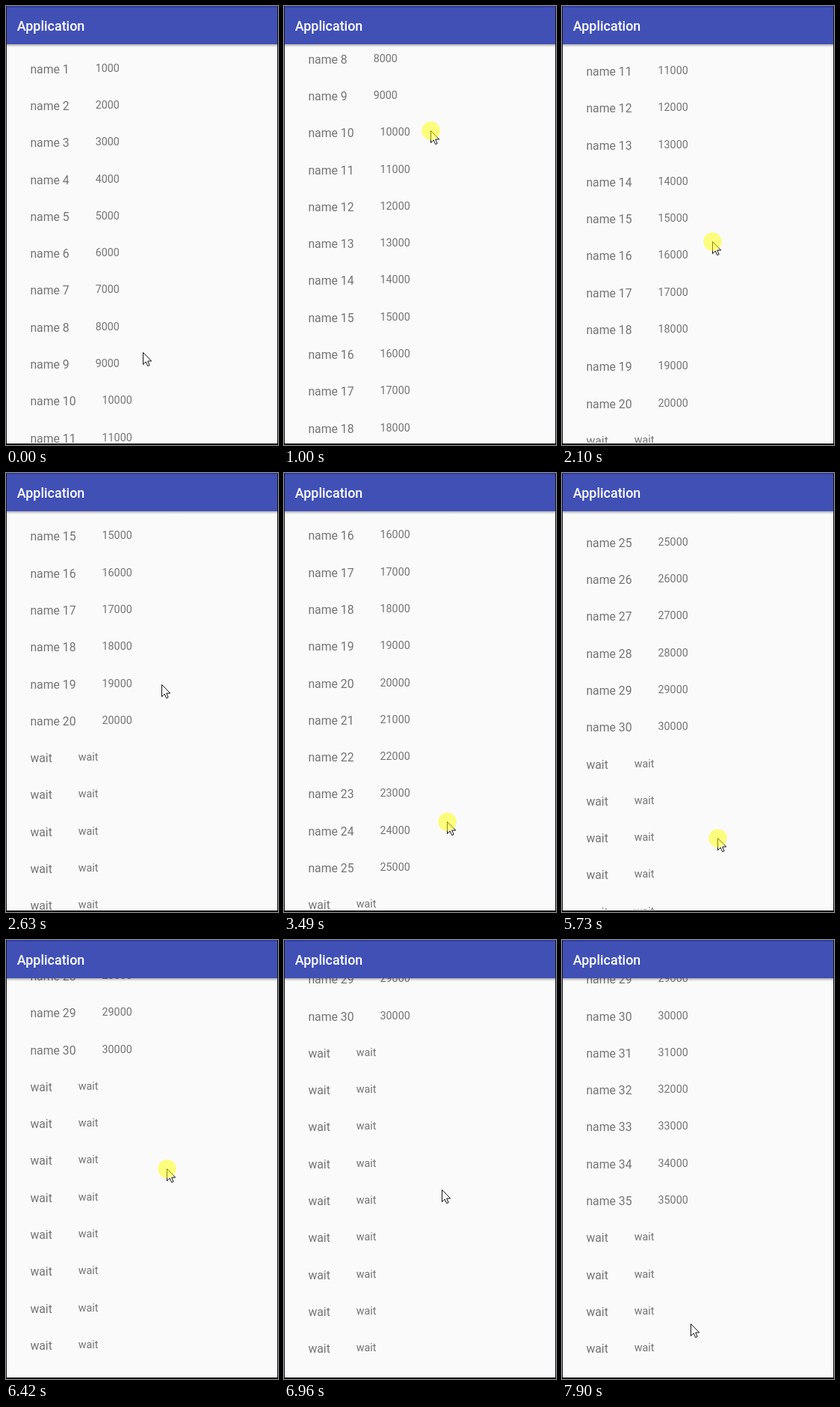
These frames come from a looping animation (364x586 px, 7990 ms). An HTML page:

```html
<!DOCTYPE html>
<html lang="en">
<head>
<meta charset="utf-8">
<title>Application</title>
<style>
  html, body { margin: 0; width: 100%; height: 100%; overflow: hidden; background: #fafafa; }
  svg { display: block; }
  text { font-family: Roboto, sans-serif; fill: #747474; }
  .name { font-size: 15.8px; }
  .value { font-size: 14.3px; }
  .title { font-size: 17.9px; font-weight: 500; fill: #fff; }
</style>
</head>
<body>
<svg width="364" height="586" viewBox="0 0 364 586">
  <defs>
    <clipPath id="view"><rect y="51" width="364" height="532"/></clipPath>
    <linearGradient id="shade" x2="0" y2="1">
      <stop offset="0" stop-opacity=".3"/>
      <stop offset="1" stop-opacity="0"/>
    </linearGradient>
  </defs>
  <rect width="364" height="586" fill="#fafafa"/>
  <g clip-path="url(#view)"><g id="list"></g></g>
  <rect y="51" width="364" height="4" fill="url(#shade)"/>
  <rect width="364" height="51" fill="#4050b5"/>
  <rect width="364" height="2" fill="#303f9f"/>
  <text class="title" x="14.8" y="33.3">Application</text>
  <rect width="1" height="586" fill="#15151d"/>
  <rect x="363" width="1" height="586" fill="#15151d"/>
  <rect y="584" width="364" height="2" fill="#050507"/>
  <g id="pointer">
    <path d="M.5 .5V16.6L4.2 13 6.7 18.6 9.1 17.5 6.7 12H11.7Z" fill="#fff" stroke="#111" stroke-linejoin="round"/>
    <circle id="press" cx=".5" cy=".5" r="12.2" fill="#ff0" fill-opacity=".5"/>
  </g>
</svg>
<script>
const LOOP = 7990, TICK = 77.33, PITCH = 49.3, ROWS = 44, PAGE = 5;
const GAIN = 1.055, SLOP = 23, DECAY = 80;

// pointer stops: time, x, y
const path = [
  [0, 183, 461], [390, 196, 528], [590, 196, 528], [970, 196, 130],
  [1850, 200, 360], [1990, 200, 360], [2430, 205, 170],
  [3100, 215, 532], [3365, 215, 532], [4065, 234, 150], [4261, 199, 364],
  [5100, 206, 533], [5556, 206, 533], [6505, 216, 284], [6850, 216, 310], [7895, 172, 512]
];
const swipes = [
  { press: 460, start: 590, end: 970, fling: 70 },
  { press: 1850, start: 1990, end: 2430, fling: 51.5 },
  { press: 3170, start: 3365, end: 4065, fling: 78 },
  { press: 5500, start: 5556, end: 6505, fling: 23.3 }
];
const loads = [3020, 4900, 7200];

function pointerAt(t) {
  const i = path.findIndex(p => p[0] > t);
  if (i < 0) return path.at(-1).slice(1);
  const [t0, x0, y0] = path[i - 1], [t1, x1, y1] = path[i];
  const u = (t - t0) / (t1 - t0);
  return [x0 + (x1 - x0) * u, y0 + (y1 - y0) * u];
}

// the list follows the finger beyond the touch slop, then coasts to rest
function scrollAt(t) {
  return swipes.reduce((sum, { start, end, fling }) => {
    if (t <= start) return sum;
    const pulled = pointerAt(start)[1] - pointerAt(Math.min(t, end))[1];
    const coast = 1 - Math.exp(-Math.max(0, t - end) / DECAY);
    return sum + GAIN * Math.max(0, pulled - SLOP) + fling * coast;
  }, 0);
}

const $ = id => document.getElementById(id);
const list = $("list"), pointer = $("pointer"), press = $("press");

function label(kind, y) {
  const el = document.createElementNS("http://www.w3.org/2000/svg", "text");
  el.setAttribute("class", kind);
  el.setAttribute("y", y);
  list.append(el);
  return el;
}
const rows = Array.from({ length: ROWS }, (_, i) => ({
  name: label("name", 89.6 + PITCH * i),
  value: label("value", 87.6 + PITCH * i)
}));

let shown = 0;
function fill(count) {
  if (count === shown) return;
  shown = count;
  rows.forEach(({ name, value }, i) => {
    const n = i + 1, ready = n <= count;
    name.textContent = ready ? "name " + n : "wait";
    value.textContent = ready ? n * 1000 : "wait";
    name.setAttribute("x", 32.4);
    value.setAttribute("x", 67.3 + name.getComputedTextLength());
  });
}

function draw() {
  const now = performance.now() % LOOP;
  const t = Math.floor(now / TICK) * TICK + 8;
  const [x, y] = pointerAt(t);
  fill(4 * PAGE + PAGE * loads.filter(time => t >= time).length);
  list.setAttribute("transform", `translate(0 ${-scrollAt(t)})`);
  pointer.setAttribute("transform", `translate(${Math.round(x)} ${Math.round(y)})`);
  press.style.display = swipes.some(s => t >= s.press && t < s.end) ? "" : "none";
  requestAnimationFrame(draw);
}
draw();
</script>
</body>
</html>
```
